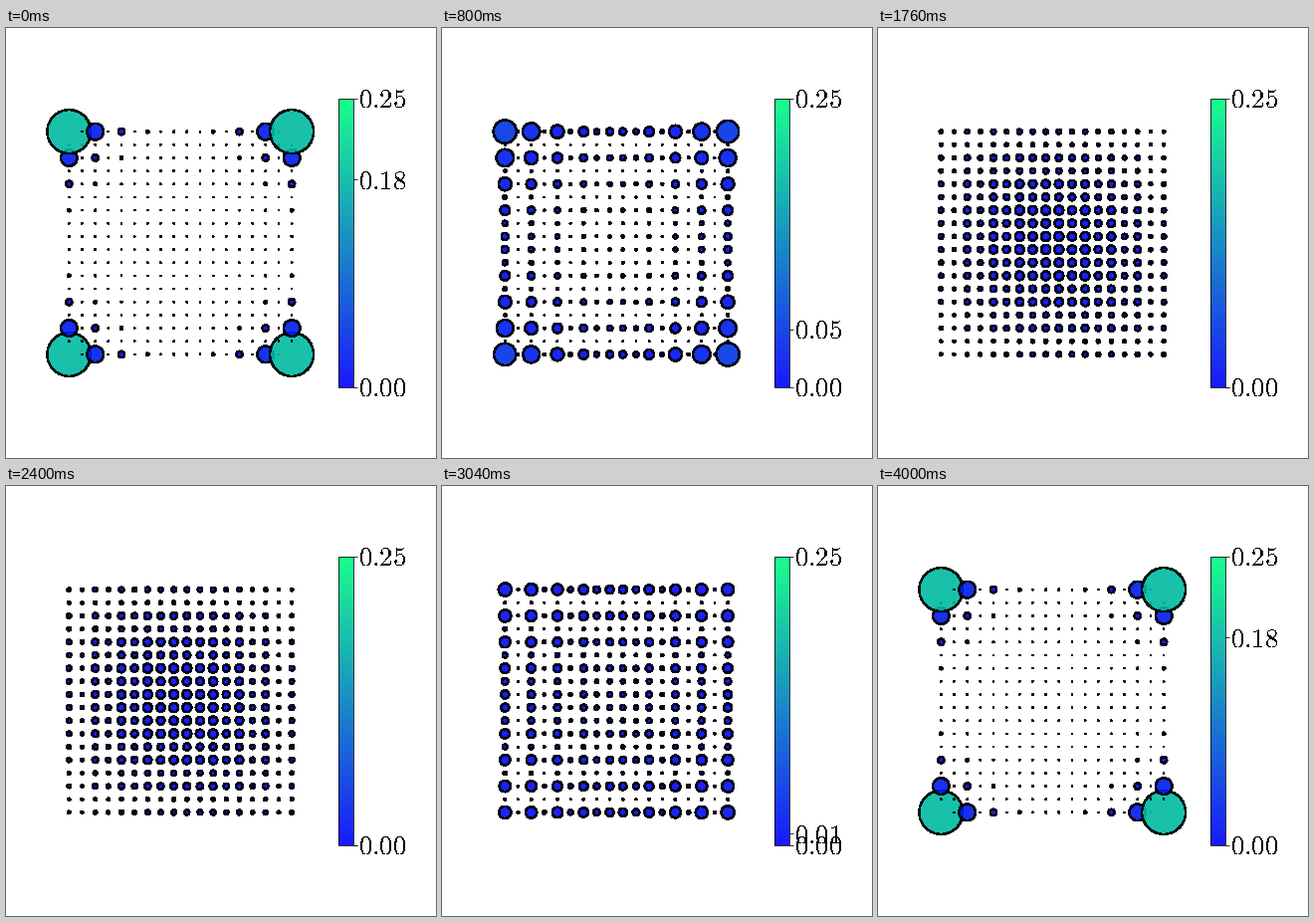
Write a matplotlib script that moves like this. It is 432x432 px and loops after 4080 ms.

```python
import numpy as np
import matplotlib.pyplot as plt
from matplotlib.animation import FuncAnimation

SIZE, DPI = 432, 72
FRAMES, INTERVAL = 51, 80
N = 18                      # sites per side
VMAX = 0.25
DIMER = 0.45                # largest hopping imbalance
BAR_Y, BAR_H = 71, 290

plt.rcParams["mathtext.fontset"] = "cm"
plt.rcParams["text.antialiased"] = False

fig = plt.figure(figsize=(SIZE / DPI, SIZE / DPI), dpi=DPI, facecolor="white")


def add_axes(x, y, w, h):
    return fig.add_axes([x / SIZE, y / SIZE, w / SIZE, h / SIZE])


def chain_density(delta):
    """Density of the mid-gap mode of an open chain with alternating hopping."""
    hop = np.where(np.arange(N - 1) % 2 == 0, 1 - delta, 1 + delta)
    _, vecs = np.linalg.eigh(np.diag(hop, 1) + np.diag(hop, -1))
    return vecs[:, N // 2] ** 2


u = np.linspace(-1, 1, N)
gx, gy = np.meshgrid(u, u)


def lattice_density(frame):
    c = np.cos(2 * np.pi * frame / (FRAMES - 1))
    p = chain_density(DIMER * c)
    flat = 0.15 * max(0, -c)
    tilt = 0.09 * (1 - c) ** 2
    density = (1 - flat) * np.outer(p, p) + flat / N**2
    return density * (1 - tilt * gx * gy)


# lattice, in pixel coordinates
ax = add_axes(0, 0, SIZE, SIZE)
ax.set(xlim=(0, SIZE), ylim=(0, SIZE))
ax.axis("off")
sites = ax.scatter(175.2 + 111.9 * gx.ravel(), 216 + 111.9 * gy.ravel(),
                   s=np.ones(N * N), c=np.zeros(N * N), cmap="winter",
                   vmin=0, vmax=VMAX, alpha=0.9, edgecolors="black",
                   linewidths=1.5, antialiaseds=False)

# translucent colour bar with its labels
bar = fig.colorbar(sites, cax=add_axes(334, BAR_Y, 14.9, BAR_H))
bar.ax.tick_params(length=3.5, width=0.8)
labels = [ax.text(354, 0, "", fontsize=27, va="baseline") for _ in range(3)]


def update(frame):
    density = lattice_density(frame)
    sites.set_sizes(np.maximum(1.05e4 * density.ravel(), 0.1))
    sites.set_array(density.ravel())
    ticks = [0, round(density[-1, -1], 2), VMAX]
    bar.set_ticks(ticks, labels=[""] * 3)
    for label, t in zip(labels, ticks):
        label.set_text(f"${t:.2f}$")
        label.set_y(BAR_Y + BAR_H * t / VMAX - 9)
    return [sites, *labels]


anim = FuncAnimation(fig, update, frames=FRAMES, interval=INTERVAL,
                     repeat=True, repeat_delay=0, blit=False)
plt.show()
```
